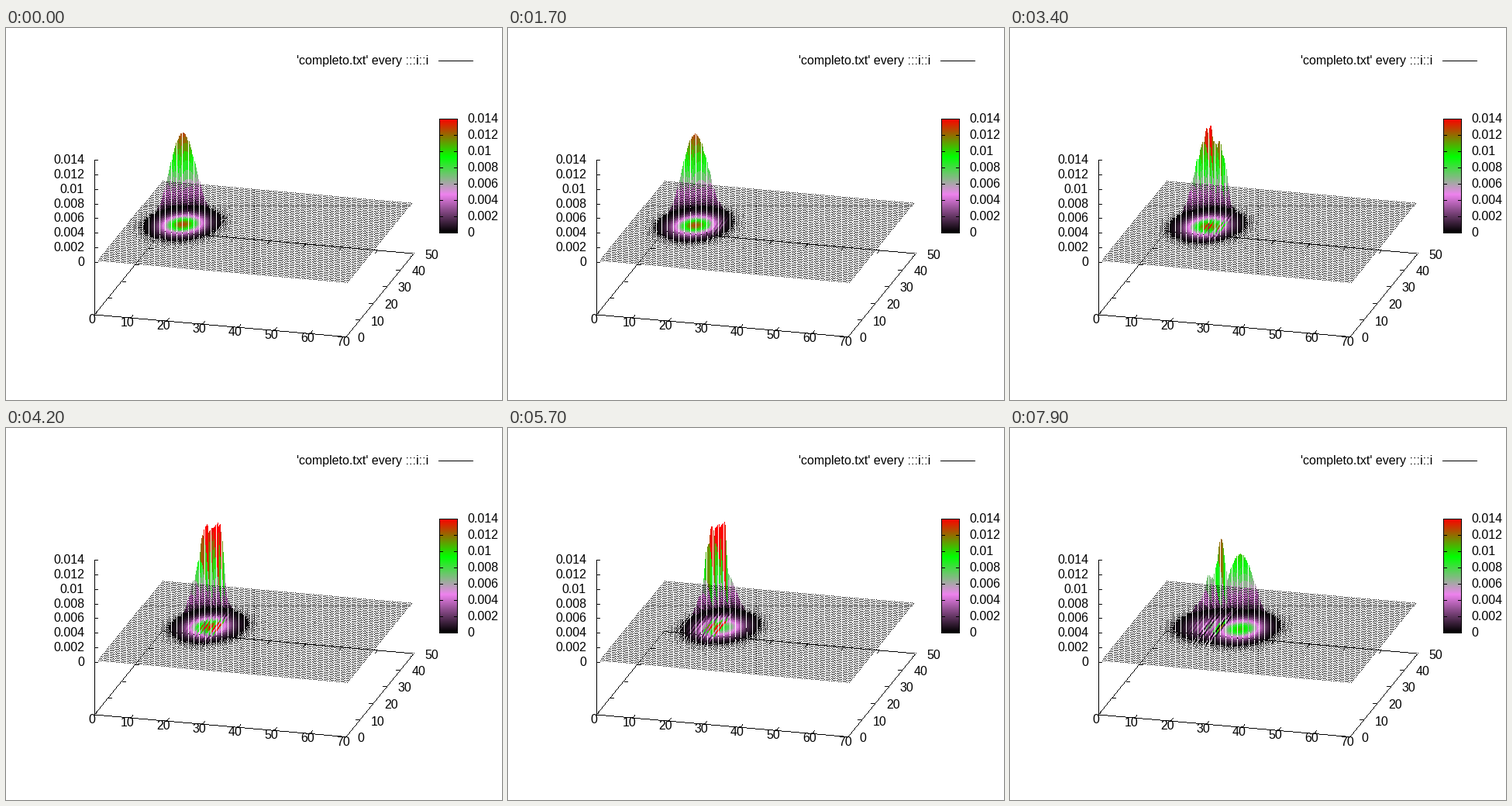
These frames come from a looping animation (640x480 px, 8000 ms). A matplotlib script:

```python
import numpy as np
import matplotlib.pyplot as plt
from matplotlib.animation import FuncAnimation

W, H, DPI = 640, 480, 100
FRAMES, INTERVAL = 80, 100
PX = 72 / DPI                      # one pixel in points
ZMAX, ZPIX = 0.014, 132            # z range and its height on screen
WALL = 25.5                        # x of the barrier
MID_X, MID_Y = 320, 229            # pixels round towards this point

plt.rcParams["font.family"] = "Liberation Sans"


def project(x, y, z=0.0):
    """Plot coordinates to pixels; z = 0 is the dotted plane."""
    px = 114 + 324.5 / 70 * x + 87 / 50 * y
    py = 302 + 28.5 / 70 * x - 107.5 / 50 * y - z / ZMAX * ZPIX
    return px, py


def floor_point(x, y):
    px, py = project(x, y)
    return px, py + 67.5


def snap(v, mid):
    return mid + np.trunc(v - mid).astype(int)


def palette(v):
    """Black, violet, green, red over 0..1."""
    stops = [0, 1 / 3, 2 / 3, 1]
    channels = ([0, 238, 0, 255], [0, 130, 255, 0], [0, 238, 0, 0])
    return np.stack([np.interp(v, stops, c) for c in channels], axis=-1)


# rows run front to back, so farther impulses cover nearer ones
gy, gx = np.meshgrid(np.linspace(1, 49, 73), np.arange(0.5, 70.1, 0.5),
                     indexing="ij")
gx, gy = gx.ravel(), gy.ravel()
base_x, base_y = project(gx, gy)
col, foot = snap(base_x, MID_X), snap(base_y, MID_Y)


def density(t):
    """Gaussian packet that meets a thin barrier and partly reflects."""
    centre = 15 + 0.165 * t + 0.0003 * t * t
    width = 25 * (1 + 0.12 * (t / 79) ** 2)

    def packet(c):
        return np.exp(-((gx - c) ** 2 + (gy - 25) ** 2) / width) / (np.pi * width)

    passed = np.interp(t, [57, 79], [0.7, 0.92])
    returned = np.interp(t, [57, 79], [0.1, 0.3])
    there, back = packet(centre), returned * packet(2 * WALL - centre)
    crest = 25.1 - 0.02 * max(0, t - 50)
    fringe = np.cos(2 * np.pi * (gx - crest) / 1.17)
    left = there + back + 2 * np.sqrt(there * back) * fringe
    return np.where(gx < WALL, left, passed * there)


canvas = np.full((H, W, 3), 255, np.uint8)


def impulses(t):
    z = np.clip(density(t), 0, ZMAX)
    top = snap(base_y - z / ZMAX * ZPIX, MID_Y)
    count = foot - top + 1
    owner = np.repeat(np.arange(len(z)), count)
    step = np.arange(len(owner)) - np.repeat(np.cumsum(count) - count, count)
    img = canvas.copy()
    img[foot[owner] - step, col[owner]] = palette(z / ZMAX)[owner]
    return img


fig = plt.figure(figsize=(W / DPI, H / DPI), dpi=DPI, facecolor="white")
ax = fig.add_axes([0, 0, 1, 1])
ax.axis("off")


def line(a, b):
    """One pixel wide black line without smoothing."""
    n = int(max(abs(b[0] - a[0]), abs(b[1] - a[1]))) + 1
    xs = np.rint(np.linspace(a[0], b[0], n)).astype(int)
    ys = np.rint(np.linspace(a[1], b[1], n)).astype(int)
    canvas[ys, xs] = 0


def tick(p, dx, dy):
    line(p, (p[0] + dx, p[1] + dy))


def label(x, y, s, ha="center"):
    ax.text(x, y + 5.5, s, ha=ha, va="baseline", fontsize=16 * PX, zorder=4)


# floor frame with its ticks
corners = [floor_point(*c) for c in ((0, 0), (70, 0), (70, 50), (0, 50))]
for a, b in zip(corners, corners[1:] + corners[:1]):
    line(a, b)
for x in range(0, 71, 10):
    near, far = floor_point(x, 0), floor_point(x, 50)
    tick(near, 3, -4)
    tick(far, -3, 4)
    label(near[0] - 3.5, near[1] + 6, str(x))
for y in range(0, 51, 10):
    near, far = floor_point(0, y), floor_point(70, y)
    tick(near, 5, 0.4)
    tick(far, -5, -0.4)
    label(far[0] + (24 if y else 19.5), far[1] + 1.5, str(y))

# z axis and colour bar
line((114, 170), (114, 369))
left, right, upper, lower = 559, 582, 117, 264
canvas[upper:lower, left:right] = palette(np.linspace(1, 0, lower - upper))[:, None]
box = [(left, upper), (right, upper), (right, lower), (left, lower)]
for a, b in zip(box, box[1:] + box[:1]):
    line(a, b)
for i in range(8):
    text = f"{i * 0.002:g}"
    zy = round(302 - i * ZPIX / 7)
    tick((114, zy), 4, 0)
    label(101, zy - 0.5, text, "right")
    cy = lower - i * (lower - upper) / 7
    tick((left, cy), 4, 0)
    tick((right, cy), -4, 0)
    label(595, cy - 0.5, text, "left")

# key
label(545, 41, "'completo.txt' every :::i::i", "right")
line((558, 42), (602, 42))

picture = ax.imshow(impulses(0), extent=(0, W, H, 0), aspect="auto",
                    interpolation="nearest")
ax.set_xlim(0, W)
ax.set_ylim(H, 0)


def update(t):
    picture.set_data(impulses(t))
    return (picture,)


anim = FuncAnimation(fig, update, frames=FRAMES, interval=INTERVAL,
                     repeat=True, repeat_delay=0)
plt.show()
```
